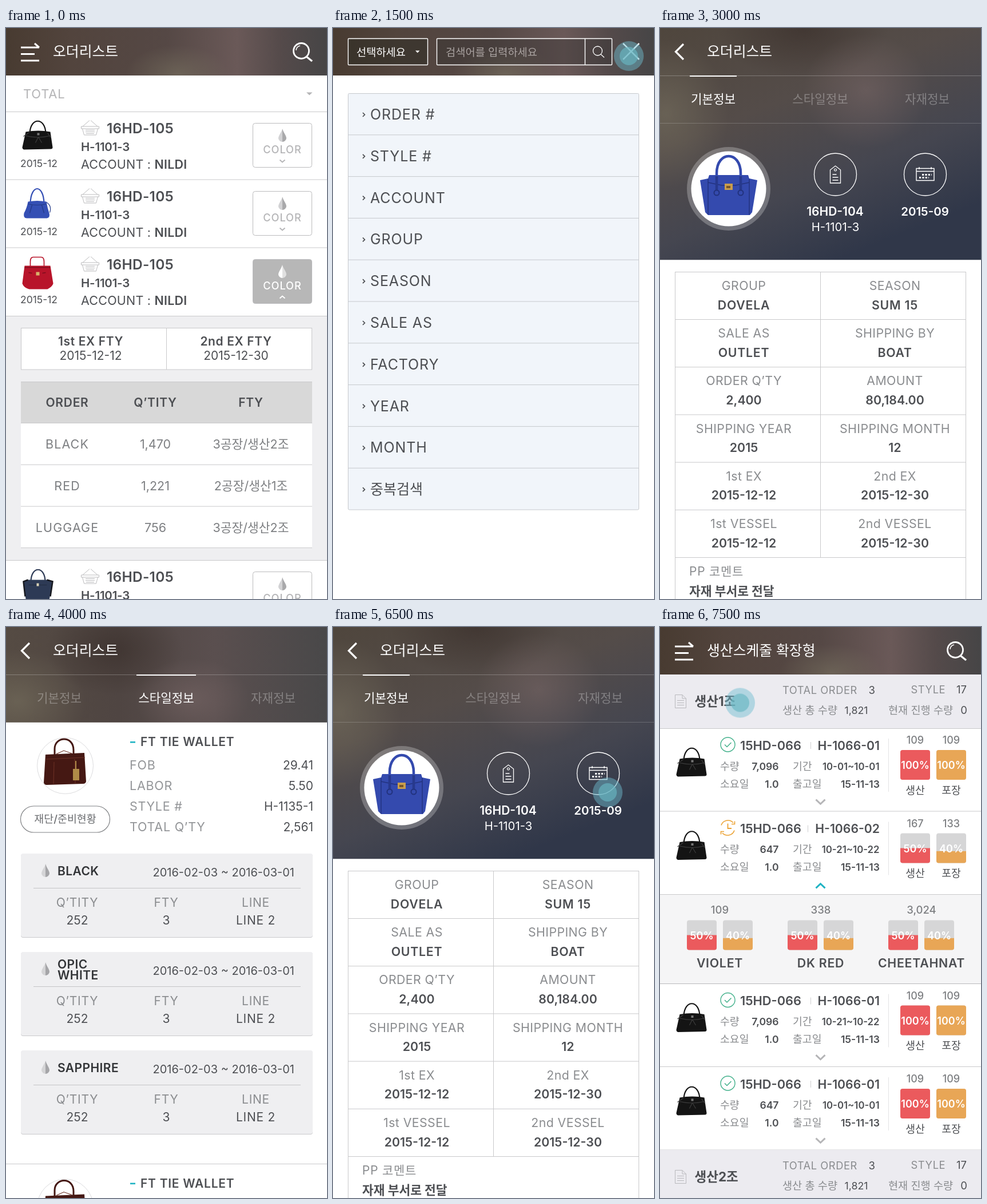
An HTML page that plays this animation: 561x998 px, repeating every 8000 ms.

```html
<!DOCTYPE html>
<html lang="ko">
<head>
<meta charset="utf-8">
<title>Order app</title>
<style>
html, body { margin: 0; width: 100%; height: 100%; overflow: hidden; background: #fff; }
#stage { display: block; width: 561px; height: 998px; }
text { font-family: Inter, "Noto Sans CJK KR", "Noto Sans CJK", sans-serif; white-space: pre; }
</style>
</head>
<body>
<svg id="stage" viewBox="0 0 561 998">
  <defs>
    <linearGradient id="bar">
      <stop offset="0" stop-color="#483b31"/><stop offset=".2" stop-color="#52443d"/>
      <stop offset=".5" stop-color="#554845"/><stop offset=".72" stop-color="#6a5958"/>
      <stop offset=".86" stop-color="#544a4a"/><stop offset="1" stop-color="#464546"/>
    </linearGradient>
    <linearGradient id="tabs">
      <stop offset="0" stop-color="#554b43"/><stop offset=".35" stop-color="#4f4542"/>
      <stop offset=".65" stop-color="#5a4f4f"/><stop offset="1" stop-color="#494849"/>
    </linearGradient>
    <linearGradient id="tall" x2=".55" y2="1">
      <stop offset="0" stop-color="#4f463d"/><stop offset=".4" stop-color="#544c49"/>
      <stop offset=".72" stop-color="#454650"/><stop offset="1" stop-color="#303749"/>
    </linearGradient>
    <radialGradient id="olive"><stop stop-color="#77705f" stop-opacity=".6"/><stop offset="1" stop-color="#77705f" stop-opacity="0"/></radialGradient>
    <radialGradient id="rose"><stop stop-color="#7d6a6a" stop-opacity=".5"/><stop offset="1" stop-color="#7d6a6a" stop-opacity="0"/></radialGradient>
    <radialGradient id="dark"><stop stop-color="#372c28" stop-opacity=".6"/><stop offset="1" stop-color="#372c28" stop-opacity="0"/></radialGradient>
  </defs>
</svg>
<script>
const INK = '#4d4f53', GREY = '#8a8c8f', PALE = '#b5b5b7', LINE = '#c9c9cb', TEAL = '#1fb3c3';
const RED = '#eb5a5d', ORANGE = '#e8a656';

// Drawing helpers
const text = (s, x, y, { size = 21.5, weight = 400, fill = INK, at = 'start', gap } = {}) => {
  const spacing = gap ?? (/^[A-Z][A-Z’]/.test(s) ? .035 : 0);
  return `<text x="${x}" y="${y}" font-size="${size}" font-weight="${weight}" fill="${fill}" text-anchor="${at}" letter-spacing="${spacing * size}">${s}</text>`;
};
const mid = (s, x, y, o) => text(s, x, y, { ...o, at: 'middle' });
const end = (s, x, y, o) => text(s, x, y, { ...o, at: 'end' });
const rect = (x, y, w, h, fill, more = '') => `<rect x="${x}" y="${y}" width="${w}" height="${h}" fill="${fill}" ${more}/>`;
const path = (d, stroke, width = 1, more = 'fill="none"') => `<path d="${d}" stroke="${stroke}" stroke-width="${width}" ${more}/>`;
const ring = (x, y, r, stroke, width = 1, fill = 'none') => `<circle cx="${x}" cy="${y}" r="${r}" fill="${fill}" stroke="${stroke}" stroke-width="${width}"/>`;
const hline = (y, x1 = 0, x2 = 561, c = LINE) => path(`M${x1} ${y}H${x2}`, c);
const move = (x, y, s, k = 1) => `<g transform="translate(${x} ${y}) scale(${k})">${s}</g>`;
const glow = (id, x, y, rx, ry) => `<ellipse cx="${x}" cy="${y}" rx="${rx}" ry="${ry}" fill="url(#${id})"/>`;
const chevron = (x, y, w, h, c, width) => path(`M${x - w} ${y - h}L${x} ${y + h}L${x + w} ${y - h}`, c, width);

// Icons
const drop = (x, y, light, shade) =>
  `<path d="M${x} ${y - 12}C${x - 2} ${y - 5} ${x - 7} ${y} ${x - 7} ${y + 5}A7 7 0 0 0 ${x} ${y + 11}Z" fill="${light}"/>` +
  `<path d="M${x} ${y - 12}C${x + 2} ${y - 5} ${x + 7} ${y} ${x + 7} ${y + 5}A7 7 0 0 1 ${x} ${y + 11}Z" fill="${shade}"/>`;
const basket = path('M131.5 26H162.5V30H131.5ZM133.5 30L136.5 41H157.5L160.5 30M134 26L146 15.5M160 26L148 15.5M139 32.5H155M139 35.5H155M140 38.5H154', '#bcbcbe');
const tag = (x, y, c, k = 1) => move(x, y, path('M-9 15V-8L0 -15L9 -8V15ZM-5 0H2M-5 5H5M-5 10H5', c, 1.3) + ring(0, -8, 2, c, 1.2), k);
const calendar = path('M448 245.5H479V266.5H448ZM448 250.5H479M453 243V247M474 243V247', '#fff', 1.4) +
  path('M458 256.5H475M453 261.5H470', '#fff', 3.2, 'fill="none" stroke-dasharray="3.2 2.2"');
const lens = path('M525 50L535 58', '#fff', 3.5) + ring(516, 40, 13.5, '#fff', 2.8) + path('M507 39A9 9 0 0 1 514 31', '#fff', 1.5);
const menu = path('M26 34H58M26 45.5H50M26 57H58M50 27L58 34', '#fff', 3);
const back = path('M41 28L27.5 41.5L41 55', '#fff', 3.2);

// Bags: body outline, handle, colour, trim
const bag = (body, handle, fill, trim, width = 2.2) =>
  path(handle, fill, width) + `<path d="${body}" fill="${fill}"/>` + trim;
const blackBag = bag('M6 20Q28 16 49 20L53 47Q53 50 50 50L3 51Q0 50 0 47Z', 'M13 23C14 -6 40 -6 41 23', '#141414',
  path('M6 27Q28 32 48 27M28 29L23 39M28 29L34 39M2 28L12 21M44 22L50 30', '#3d3d3d', 1.2) + rect(26, 22, 4, 4, '#777'));
const blueBag = bag('M10 23Q26 20 42 23Q44 34 47 43Q49 51 43 52H8Q1 52 3 43Q8 34 10 23Z', 'M14 26C15 -8 37 -8 38 26', '#344fb4',
  path('M10 27Q26 31 42 27M17 29L13 43M34 29L38 43M42 24Q52 30 48 42', '#233986', 1.2));
const redBag = bag('M4 16H49L54 47Q53 52 44 57H12Q2 54 0 47Z', 'M14 28V9Q14 1 19 1H33Q38 1 38 9V28', '#b8142a',
  path('M4 19H49M11 28L17 29M35 29L41 28', '#7f0c1c', 1.3) + rect(24, 27, 6, 6, '#d8b26a'), 1.7);
const navyBag = bag('M2 22L10 19H43L53 22L46 60H7Z', 'M15 23C15 -6 40 -6 40 23', '#2d3a55',
  path('M10 19L2 22L5 48M43 19L53 22L49 48', '#17191f', 2.5) + path('M11 28H43', '#222b40', 1) + rect(25, 25, 4, 5, '#d9d2b6'));
const winged = bag('M18 34H86L88 40L102 43L93 99L89 104H16L11 99L2 43L16 40Z', 'M31 58V31C31 -9 73 -9 73 31V58', '#344aae',
  path('M16 41V103M88 41V103M16 47L40 52H64L88 47', '#22327d', 1.4) +
  path('M31 36V60M73 36V60', '#27398d', 4.5) + ring(31, 65, 4.5, '#22327d', 2, '#344aae') + ring(73, 65, 4.5, '#22327d', 2, '#344aae') +
  rect(45, 49, 14, 11, '#c99d4c') + rect(48, 53, 7, 4, '#78552a'), 4.5);
const clutch = bag('M3 28L71 25L74 75Q73 79 69 79L5 81Q1 81 0 77Z', 'M19 41V18C19 -4 52 -6 52 20V36', '#451813',
  path('M4 36L72 33M18 41L17 79M54 36L55 78M22 27L35 21L49 26', '#6b3025', 1.1) + rect(51, 53, 11, 20, '#b08b48') + path('M56 39V53', '#b08b48', 2), 3);

// Headers: the nested svg clips the glows
const backdrop = (h, fill, glows) => `<svg width="561" height="${h}">${rect(0, 0, 561, h, `url(#${fill})`)}${glows}</svg>`;
const title = s => text(s, 82, 50, { size: 24.8, weight: 350, fill: '#fff' });
const bar = s => backdrop(83, 'bar', glow('olive', 300, 80, 90, 50)) + (s ? menu + lens + title(s) : '');
const tabs = [['기본정보', 93, 41], ['스타일정보', 280, 52], ['자재정보', 467, 41]];
const tabHeader = (active, h) =>
  (h > 200
    ? backdrop(h, 'tall', glow('olive', 10, 150, 110, 130) + glow('dark', 250, 0, 150, 90) + glow('rose', 360, 110, 110, 100))
    : backdrop(h, 'tabs', glow('olive', 20, 130, 120, 90) + glow('dark', 190, 40, 120, 80) + glow('rose', 325, 125, 100, 70))) +
  back + title('오더리스트') + hline(83.5, 0, 561, '#ffffff40') + hline(166.5, 0, 561, '#ffffff30') +
  tabs.map(([s, x, w], i) => mid(s, x, 131.5, { size: 21.2, weight: i === active ? 500 : 350, fill: i === active ? '#fff' : '#ffffff4d' }) +
    (i === active ? rect(x - w, 83, 2 * w, 2, '#fff') : '')).join('');

// Order list
const orderRow = (y, art, open) => {
  const c = open ? '#fff' : PALE;
  return move(0, y, move(28.5, 15.5, art) + basket +
    mid('2015-12', 57.5, 97, { size: 17.5 }) +
    text('16HD-105', 176, 38, { size: 24.5, weight: 600, gap: .01 }) +
    text('H-1101-3', 131, 69, { size: 20.5, weight: 600, gap: -.01 }) +
    text('ACCOUNT : <tspan font-weight="600">NILDI</tspan>', 131, 99.5, { gap: .01 }) +
    rect(431.5, 20.5, 103, 77, open ? '#b7b7b7' : '#fff', 'rx="4" stroke="#bbbbbd"') +
    drop(483, 42, open ? '#fff' : '#d2d2d4', open ? '#e0e0e0' : '#a9a9ab') +
    mid('COLOR', 483, 73, { size: 18.2, weight: 500, fill: c, gap: .05 }) +
    chevron(483, 86.5, 4.5, open ? -2 : 2, c, 2));
};
const orders = [['BLACK', '1,470', '3공장/생산2조'], ['RED', '1,221', '2공장/생산1조'], ['LUGGAGE', '756', '3공장/생산2조']];
const cols = [107, 261, 428];
const listScreen = () => bar('오더리스트') +
  text('TOTAL', 30, 122.5, { size: 22, fill: PALE }) + `<path d="M525 112.5H535.5L530.3 117.5Z" fill="${PALE}"/>` +
  [146.5, 265, 384].map(y => hline(y)).join('') +
  orderRow(146, blackBag) + orderRow(265, blueBag) + orderRow(384, redBag, true) +
  rect(0, 503, 561, 427.5, '#efeff1') + hline(503.5) + hline(930.5) +
  rect(26.5, 524.5, 508, 72.5, '#fff', `stroke="${LINE}"`) + path('M280.5 524V597', LINE) +
  mid('1st EX FTY', 148, 555, { size: 21, weight: 600, gap: .03 }) + mid('2015-12-12', 148, 580, { size: 21 }) +
  mid('2nd EX FTY', 402, 555, { size: 21, weight: 600, gap: .03 }) + mid('2015-12-30', 402, 580, { size: 21 }) +
  rect(26, 618, 509, 291, '#fff') + rect(26, 618, 509, 72.5, '#d8d8d8') + hline(618.5, 26, 535) +
  ['ORDER', 'Q’TITY', 'FTY'].map((s, i) => mid(s, cols[i], 662, { size: 21, weight: 600 })).join('') +
  orders.map((row, r) => hline(690.5 + r * 72.8, 26, 535) +
    row.map((s, i) => mid(s, cols[i], 735 + r * 72.8, { fill: '#7d7f82', gap: i ? 0 : .05 })).join('')).join('') +
  hline(908.5, 26, 535) + orderRow(930, navyBag);

// Search
const fields = ['ORDER #', 'STYLE #', 'ACCOUNT', 'GROUP', 'SEASON', 'SALE AS', 'FACTORY', 'YEAR', 'MONTH', '중복검색'];
const searchScreen = () => bar() +
  rect(26.5, 18.5, 139, 46, '#2a2a2280', 'rx="1" stroke="#fff" stroke-width="1.4"') +
  text('선택하세요', 41, 48.5, { size: 18.7, weight: 300, fill: '#fff' }) + '<path d="M144 39.5H151.5L147.7 43.5Z" fill="#fff"/>' +
  rect(181.5, 18.5, 306, 46, '#2a2a2a55', 'rx="1" stroke="#fff" stroke-width="1.4"') + path('M440.5 18V65', '#fff', 1.4) +
  text('검색어를 입력하세요', 197, 48.5, { size: 18.7, weight: 300, fill: '#aaa3a1' }) +
  ring(462.5, 40, 8, '#fff', 1.3) + path('M468 46L474 51.5', '#fff', 1.3) +
  path('M507 27L535 55M535 27L507 55', '#fff', 2.6) +
  rect(26.5, 114.5, 508, 727.5, '#f1f5fa', 'rx="2" stroke="#c6c9cd"') +
  fields.map((s, i) => move(0, i * 72.8, (i ? hline(114, 26, 535, '#c6c9cd') : '') +
    path('M52 148L55.5 151.5L52 155', INK, 1.7) + text(s, 65, 160, { size: 25 }))).join('');

// Basic info
const facts = [
  ['GROUP', 'DOVELA', 'SEASON', 'SUM 15'], ['SALE AS', 'OUTLET', 'SHIPPING BY', 'BOAT'],
  ['ORDER Q’TY', '2,400', 'AMOUNT', '80,184.00'], ['SHIPPING YEAR', '2015', 'SHIPPING MONTH', '12'],
  ['1st EX', '2015-12-12', '2nd EX', '2015-12-30'], ['1st VESSEL', '2015-12-12', '2nd VESSEL', '2015-12-30']];
const infoScreen = () => tabHeader(0, 405.5) +
  `<circle cx="120" cy="281" r="73" fill="#ffffff40"/><circle cx="120" cy="281" r="65.5" fill="#fff"/>` + move(68, 223, winged) +
  ring(306.5, 256, 37, '#fff', 1.3) + tag(306.5, 256, '#fff') + ring(463.5, 256, 37, '#fff', 1.3) + calendar +
  mid('16HD-104', 306, 328, { size: 21, weight: 600, fill: '#fff' }) + mid('H-1101-3', 306.5, 355, { size: 20.3, fill: '#fff' }) +
  mid('2015-09', 463, 328, { size: 20.5, weight: 600, fill: '#fff' }) +
  rect(26.5, 426.5, 508, 600, '#fff', `stroke="${LINE}"`) + path('M280.5 426V925', LINE) +
  facts.map((row, r) => move(0, r * 83.2, hline(509.5, 26, 535) + row.map((s, i) =>
    mid(s, i < 2 ? 146.5 : 410.5, i % 2 ? 491.5 : 458, i % 2 ? { weight: 600, size: 21.3 } : { fill: GREY, size: 21.3, gap: .02 })).join(''))).join('') +
  text('PP 코멘트', 51, 957, { fill: GREY, size: 21 }) + text('자재 부서로 전달', 51, 992, { weight: 700 });

// Style and material cards
const card = (y, h, s) => move(0, y, rect(26, 1, 510, h, '#c9c9cc', 'rx="4"') + rect(26, 0, 510, h, '#efeff1', 'rx="4"') + hline(60.5, 48, 515, '#c4c4c6') + s);
const styleHead = y => move(0, y, ring(103.5, 242.5, 49, '#dcdcde') + move(66, 195, clutch) +
  rect(217, 200, 9, 2.6, TEAL) + text('FT TIE WALLET', 235, 208, { size: 21, weight: 600 }));
const specs = [['FOB', '29.41'], ['LABOR', '5.50'], ['STYLE #', 'H-1135-1'], ['TOTAL Q’TY', '2,561']];
const shades = [['BLACK'], ['OPIC', 'WHITE'], ['SAPPHIRE']];
const counts = [['Q’TITY', '252', 124.5], ['FTY', '3', 280], ['LINE', 'LINE 2', 436.5]];
const styleScreen = () => tabHeader(1, 167) + styleHead(0) +
  rect(25.5, 313, 156, 46, '#fff', 'rx="23" stroke="#808285" stroke-width="1.2"') +
  mid('재단/준비현황', 103.5, 342, { size: 18.4, weight: 500, fill: '#6b6d70' }) +
  specs.map(([k, v], i) => text(k, 216, 249 + i * 36, { fill: '#939598' }) + end(v, 537, 249 + i * 36, { size: 21 })).join('') +
  shades.map((names, i) => card(396 + i * 172, 146, drop(69, 30, '#d4d4d6', '#a5a5a8') +
    names.map((s, n) => text(s, 90, names.length > 1 ? 29 + n * 18.5 : 38, { size: 21, weight: 600, fill: '#333538', gap: .02 })).join('') +
    end('2016-02-03 ~ 2016-03-01', 504, 40, { size: 20 }) +
    counts.map(([k, v, x]) => mid(k, x, 93, { size: 21, fill: GREY }) + mid(v, x, 124, { size: 21 })).join(''))).join('') +
  hline(938.5) + styleHead(771.5);

const parts = [['장식', '바디', 'S. RHO'], ['장식', '우라', 'S. RHO'], ['원단', '바디', 'OYSTER']];
const partsScreen = () => tabHeader(2, 167) +
  parts.map(([name, place, color], i) => card(196 + i * 278.6, 257, tag(69, 31, '#b4b4b6', .72) +
    text(name, 90, 38, { weight: 700, fill: '#333538' }) +
    end('2016-02-03', 409, 40) + end('입고예정', 504, 39.5, { weight: 500 }) +
    [['PLACEMENT', place], ['COLOR', color], ['Q’TITY', '2,400'], ['METERIAL NAME', '']].map(([k, v], r) =>
      text(k, 66.5, 93.5 + r * 36.2, { fill: GREY, gap: .045 }) + end(v, 503.5, 93.5 + r * 36.2)).join('') +
    text('NR [#366] 15mm 하도메 (로고무) (한국)', 66.5, 233, { size: 21.8, gap: .032 }))).join('');

// Production schedule
const gauge = (x, y, pct, color) => rect(x, y, 52, 52, '#d6d6d7', 'rx="4"') +
  `<path d="M${x} ${y + 52 - pct * .52 + (pct > 99 ? 4 : 0)}${pct > 99 ? 'q0 -4 4 -4h44q4 0 4 4' : 'h52'}V${y + 48}q0 4 -4 4h-44q-4 0 -4 -4Z" fill="${color}"/>` +
  mid(pct + '%', x + 26, y + 33, { size: 18, weight: 600, fill: '#fff' });
const small = { size: 18.3, fill: GREY }, bold = { size: 17.6, weight: 600 };
const section = (y, name) => move(0, y, rect(0, 83, 561, 94, '#ecebf0') + hline(177.5) +
  path('M26.5 118.5H39L45.5 125V141.5H26.5ZM39 118.5V125H45.5M30 128.5H42M30 132.5H42M30 136.5H42', '#b9b9bd') +
  text(name, 60.5, 138, { size: 22.5, weight: 700 }) +
  text('TOTAL ORDER', 214, 117, { ...small, gap: .03 }) + end('3', 376, 117, { size: 18.5 }) +
  text('STYLE', 438.5, 116, small) + end('17', 536, 116, { size: 18.5 }) +
  text('생산 총 수량', 214, 152, { ...small, size: 18.6 }) + end('1,821', 363.5, 152, { size: 17.8 }) +
  text('현재 진행 수량', 399, 152, { ...small, size: 18.6 }) + end('0', 537, 152, { size: 18.5 }));
const check = ring(118.5, 28.5, 12.5, '#41b08a', 1.4) + path('M113 28.5L117 32.5L124.5 25', '#41b08a', 1.5);
const clock = path('M107 24A12.5 12.5 0 0 1 128 19.5M130 33A12.5 12.5 0 0 1 109 37.5M130.5 17V22H125M106.5 40V35H112', '#eba234', 1.6) + path('M118.5 21V29.5H125', '#eba234', 1.8);
const planRow = (y, no, qty, term, open) => move(0, y, hline(145, 0, 561) + move(28.5, 33.5, blackBag) +
  (open ? clock : check) + text('15HD-066', 140, 37.5, { size: 21.8, weight: 600 }) +
  path(`M${open ? 258.5 : 263.5} 24V36`, '#cfcfd1') + end(no, 384, 37.5, { size: 21.2, weight: 600 }) +
  text('수량', 105, 72.5, small) + end(qty, 207.5, 72.5, bold) + text('기간', 232, 72.5, small) + end(term, 383.5, 72.5, { ...bold, size: 16.8 }) +
  text('소요일', 105, 103.5, small) + end('1.0', 207.5, 103.5, bold) + text('출고일', 232, 103.5, small) + end('15-11-13', 384, 103.5, bold) +
  chevron(280.5, open ? 130 : 128.5, 8, open ? -3.8 : 3.8, open ? TEAL : PALE, 3) + path('M399.5 18V111', '#e2e2e4') +
  [[420, open ? '167' : '109', open ? 50 : 100, RED, '생산'], [483, open ? '133' : '109', open ? 40 : 100, ORANGE, '포장']].map(([x, n, pct, c, label]) =>
    mid(n, x + 26, 27, { size: 18, weight: 500, fill: '#7d7f82' }) + gauge(x, 38, pct, c) + mid(label, x + 26, 114.5, { size: 18.3 })).join(''));
const planScreen = () => bar('생산스케줄 확장형') + section(0, '생산1조') +
  planRow(177, 'H-1066-01', '7,096', '10-01~10-01') + planRow(322.5, 'H-1066-02', '647', '10-21~10-22', true) +
  rect(0, 468, 561, 155, '#f5f5f6') + hline(623.5, 0, 561, '#b9b9bb') +
  [['109', 'VIOLET', 104.5], ['338', 'DK RED', 281], ['3,024', 'CHEETAHNAT', 457]].map(([n, s, x], i) =>
    mid(n, x, 501, { size: 18.5, weight: 500, fill: '#7d7f82' }) + gauge(47 + i * 176, 512.5, 50, RED) + gauge(110 + i * 176, 512.5, 40, ORANGE) +
    mid(s, x, 595, { size: 21.3, weight: 600 })).join('') +
  planRow(623.5, 'H-1066-01', '7,096', '10-21~10-22') + planRow(769, 'H-1066-01', '647', '10-01~10-01') +
  section(831, '생산2조');

// Timeline: one screen per second, tapped during its second half
const screens = { list: listScreen, search: searchScreen, info: infoScreen, style: styleScreen, parts: partsScreen, plan: planScreen };
const scenes = [
  ['list', 517, 49], ['search', 517, 49], ['list', 228, 194], ['info', 306, 123],
  ['style', 495, 123], ['parts', 100, 137], ['info', 480, 289], ['plan', 140, 132.5]];
const stage = document.getElementById('stage');
const layer = markup => {
  const g = document.createElementNS('http://www.w3.org/2000/svg', 'g');
  g.innerHTML = markup;
  stage.append(g);
  return g;
};
const play = (node, pose) => {
  const steps = scenes.length * 2;
  const frames = Array.from({ length: steps + 1 }, (_, i) => {
    const step = i % steps;
    return { offset: i / steps, easing: 'step-end', ...pose(scenes[step >> 1], step % 2) };
  });
  node.animate(frames, { duration: 8000, iterations: Infinity });
};
for (const [name, draw] of Object.entries(screens))
  play(layer(rect(0, 0, 561, 998, '#fff') + draw()), ([shown]) => ({ opacity: shown === name ? 1 : 0 }));
play(layer('<circle r="26" fill="rgba(112,190,208,.47)"/><circle r="16" fill="rgba(104,182,194,.66)"/>'),
  ([, x, y], pressed) => ({ opacity: pressed, transform: `translate(${x}px, ${y}px)` }));
</script>
</body>
</html>
```
